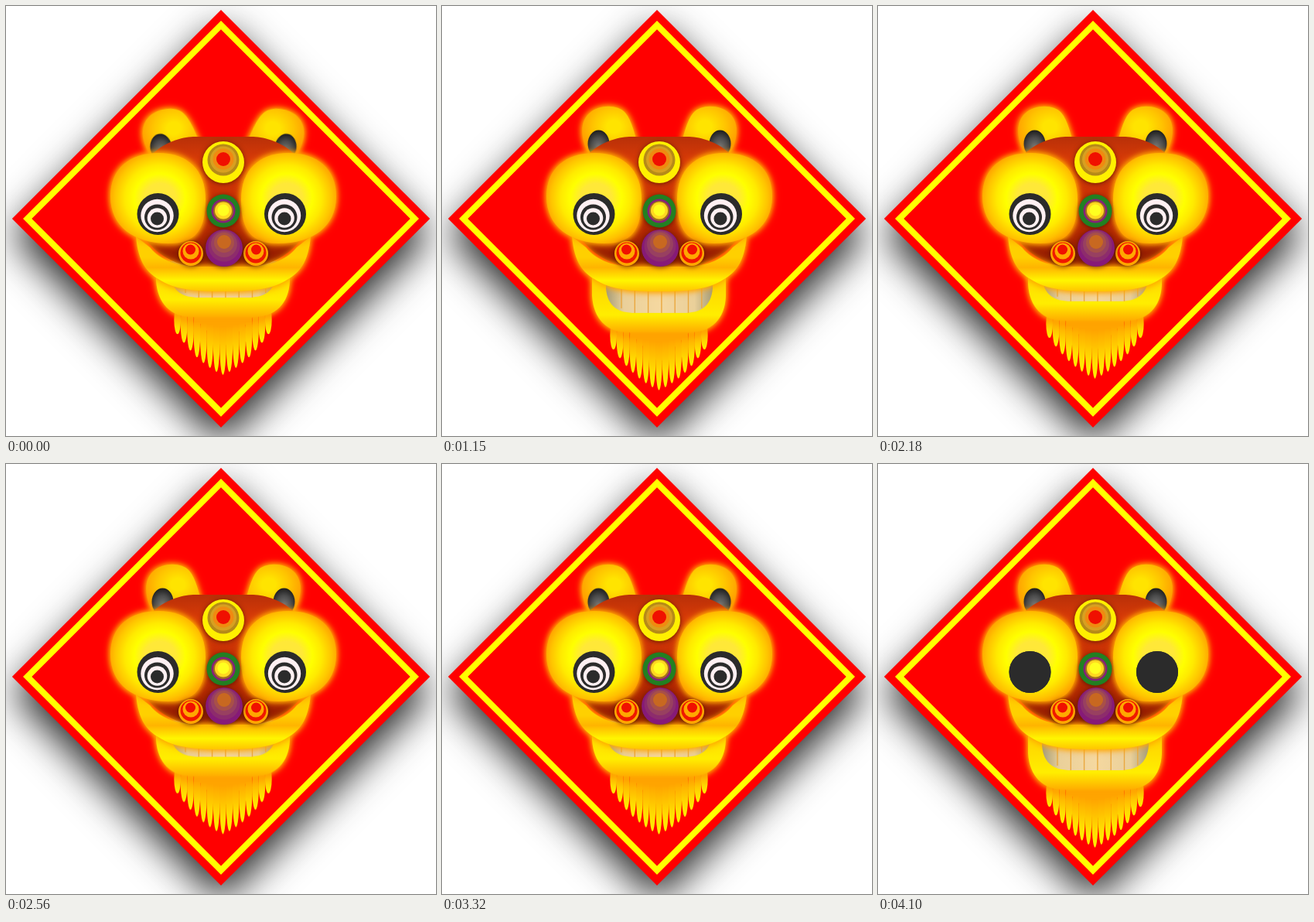
Animation, 556 px wide and 556 px high, one loop 4170 ms. Source, as an HTML page:

```html
<!DOCTYPE html>
<html lang="en">
<head>
<meta charset="utf-8">
<title>Lion dance</title>
<style>
  html, body { margin: 0; width: 100%; height: 100%; overflow: hidden; background: #fff; }
  .stage { position: relative; width: 556px; height: 556px; overflow: hidden; }
  .card {
    position: absolute; left: 87px; top: 84px; width: 382px; height: 382px;
    background: #f00; transform: rotate(45deg); box-shadow: 15px 15px 50px #000000d9;
  }
  .card::after { content: ""; position: absolute; inset: 10px; border: 8px solid #ff0; }
  svg { position: absolute; left: 0; top: 0; }

  .glow { filter: drop-shadow(0 0 3px #ffb400) drop-shadow(0 0 4px #ff9a00); }
  .raised { filter: drop-shadow(0 1px 3px #3a1000b0); }

  /* The cycle is caught 50 ms before its start. */
  .jaw, .ear, .lid { animation: chew 3.15s 50ms ease infinite both; }
  .ear { transform-origin: 235px 195px; animation-name: twitch; }
  .lid { animation-name: blink; animation-timing-function: step-end; }

  @keyframes chew { 0%, 100% { transform: none; } 40% { transform: translateY(20px); } }
  @keyframes twitch {
    0%, 10%, 20%, 100% { transform: rotate(-8deg); }
    5%, 15%, 25%, 80% { transform: rotate(0deg); }
  }
  @keyframes blink {
    0%, 16.6%, 31.6%, 100% { opacity: 0; }
    11.6%, 26.6% { opacity: 1; }
  }
</style>
</head>
<body>
<div class="stage">
  <div class="card"></div>
  <svg width="556" height="556" viewBox="0 0 556 556">
    <defs>
      <linearGradient id="hair" x2="0" y2="1">
        <stop offset=".3" stop-color="#ffa500"/><stop offset=".75" stop-color="#ffdc00"/><stop offset="1" stop-color="#fff000"/>
      </linearGradient>
      <linearGradient id="chin" gradientUnits="userSpaceOnUse" x1="0" y1="345" x2="0" y2="403">
        <stop offset="0" stop-color="#ffd800"/><stop offset=".6" stop-color="#ffee00"/><stop offset="1" stop-color="#ffaa00"/>
      </linearGradient>
      <linearGradient id="teeth">
        <stop offset="0" stop-color="#a59c78"/><stop offset=".17" stop-color="#ead09a"/>
        <stop offset=".5" stop-color="#f5d8a0"/><stop offset=".83" stop-color="#ead09a"/><stop offset="1" stop-color="#a59c78"/>
      </linearGradient>
      <radialGradient id="earSkin" cx=".55" cy=".4" r=".6">
        <stop offset=".2" stop-color="#ffe400"/><stop offset=".6" stop-color="#ffc400"/><stop offset="1" stop-color="#ff9c00"/>
      </radialGradient>
      <radialGradient id="earHole" cy=".62" r=".62">
        <stop offset="0" stop-color="#777"/><stop offset=".55" stop-color="#4c4c4c"/><stop offset="1" stop-color="#1c1c1c"/>
      </radialGradient>
      <linearGradient id="skull" x2="0" y2="1">
        <stop offset="0" stop-color="#b83008"/><stop offset=".18" stop-color="#d83a08"/>
        <stop offset=".6" stop-color="#c02c04"/><stop offset="1" stop-color="#8c1a00"/>
      </linearGradient>
      <linearGradient id="lipSkin" gradientUnits="userSpaceOnUse" x1="0" y1="325" x2="0" y2="369">
        <stop offset="0" stop-color="#ffd000"/><stop offset=".3" stop-color="#ffb400"/>
        <stop offset=".68" stop-color="#fff600"/><stop offset="1" stop-color="#ffc400"/>
      </linearGradient>
      <radialGradient id="bulgeSkin" cx=".52" cy=".5" r=".54">
        <stop offset=".3" stop-color="#ffe838"/><stop offset=".5" stop-color="#ffff00"/>
        <stop offset=".68" stop-color="#ffea00"/><stop offset=".87" stop-color="#ffc400"/><stop offset="1" stop-color="#ffa200"/>
      </radialGradient>
    </defs>

    <g class="jaw">
      <path fill="#ffa500" d="M236 395H326L281 442Z"/>
      <g id="beard" fill="url(#hair)"></g>
      <path class="glow" fill="url(#chin)" d="M194 330V355C196 385 213 402 240 402H321C348 402 366 385 367 355V330Z"/>
      <path fill="url(#teeth)" d="M212 330V345C214 369 228 377 250 377H312C334 377 348 369 350 345V330Z"/>
      <path id="gaps" stroke="#eaa840" stroke-width="1.4"/>
    </g>

    <g class="half">
      <g class="ear">
        <path class="glow" fill="url(#earSkin)" d="M192 195C178 172 178 150 190 139C203 127 227 127 237 138C246 149 249 165 256 190Z"/>
        <ellipse cx="202.5" cy="178" rx="14" ry="17.5" fill="url(#earHole)"/>
      </g>
    </g>

    <path fill="url(#skull)" d="M165 253C165 190 215 169 245 169H317C347 169 397 190 397 253C397 310 345 337 317 337H245C217 337 165 310 165 253Z"/>

    <path class="glow" fill="url(#lipSkin)" d="M168 298C171 332 183 345 197 353C218 367 245 369 281 369C317 369 344 367 365 353C379 345 391 332 394 298L376 312C362 330 337 337 315 337H247C225 337 200 330 186 312Z"/>

    <g class="half">
      <path class="glow" fill="url(#bulgeSkin)" d="M197 190C235 190 258 212 258 250C258 290 245 307 210 307C165 307 135 285 135 246C135 210 160 190 197 190Z"/>
      <g class="raised" data-rings="239 320 16 #ffa800,239 319 13.5 #f01800,239 317 10.5 #ffa800,238.5 315 6.5 #f01000"></g>
    </g>

    <g class="raised" data-rings="281 202 27 #fff000,281 199 20.5 #b58a18,281 198.5 17 #d8a020,281 198 13.5 #f08a10,281 198 9 #f01000"></g>
    <g class="raised" data-rings="281 265 21.5 #228022,281 265 15.5 #85207a,281 265 13 #a07020,281 264.5 11 #ffd820,281 264 7.5 #ffff20"></g>
    <g class="raised" data-rings="282 313 24 #861a78,282 310 20.5 #8d2c6c,282 308 17 #984060,282 306 13 #a85048,282 305 9 #c86820"></g>

    <g id="eyes"></g>
  </svg>
</div>
<script>
  const $ = s => document.querySelector(s);
  const all = s => document.querySelectorAll(s);
  const circle = (x, y, r, fill, cls = "") =>
    `<circle class="${cls}" cx="${x}" cy="${y}" r="${r}" fill="${fill}"/>`;

  for (const g of all("[data-rings]"))
    g.innerHTML = g.dataset.rings.split(",").map(s => circle(...s.split(" "))).join("");

  // Strands get shorter towards the sides.
  let hair = "";
  for (let i = -7; i <= 7; i++) {
    const n = Math.abs(i), tip = 477 - 3.2 * n - 0.62 * n * n, top = 388;
    hair += `<ellipse cx="${280.5 + 8.4 * i}" cy="${(top + tip) / 2}" rx="4.4" ry="${(tip - top) / 2}"/>`;
  }
  $("#beard").innerHTML = hair;

  $("#gaps").setAttribute("d",
    Array.from({ length: 7 }, (_, i) => `M${232 + 17.3 * i} 340V${i % 6 ? 377 : 371}`).join(""));

  const dark = "#2b2b2b", white = "#fff0f2";
  const eye = x =>
    circle(x, 269, 27, dark) + circle(x - 1, 271, 21.2, white) + circle(x - 1, 273, 16.5, dark) +
    circle(x - 1, 274, 12.8, white) + circle(x - 1, 275, 8.5, dark) + circle(x, 269, 27, dark, "lid");
  $("#eyes").innerHTML = eye(196.5) + eye(361);

  for (const g of all(".half")) {
    const twin = g.cloneNode(true);
    twin.setAttribute("transform", "translate(562 0) scale(-1 1)");
    g.after(twin);
  }

  // The loop restarts partway through the second cycle.
  const LOOP = 4170;
  const moves = document.getAnimations();
  moves.forEach(a => a.pause());
  const start = performance.now();
  function draw() {
    const t = (performance.now() - start) % LOOP;
    moves.forEach(a => { a.currentTime = t; });
    requestAnimationFrame(draw);
  }
  draw();
</script>
</body>
</html>
```
